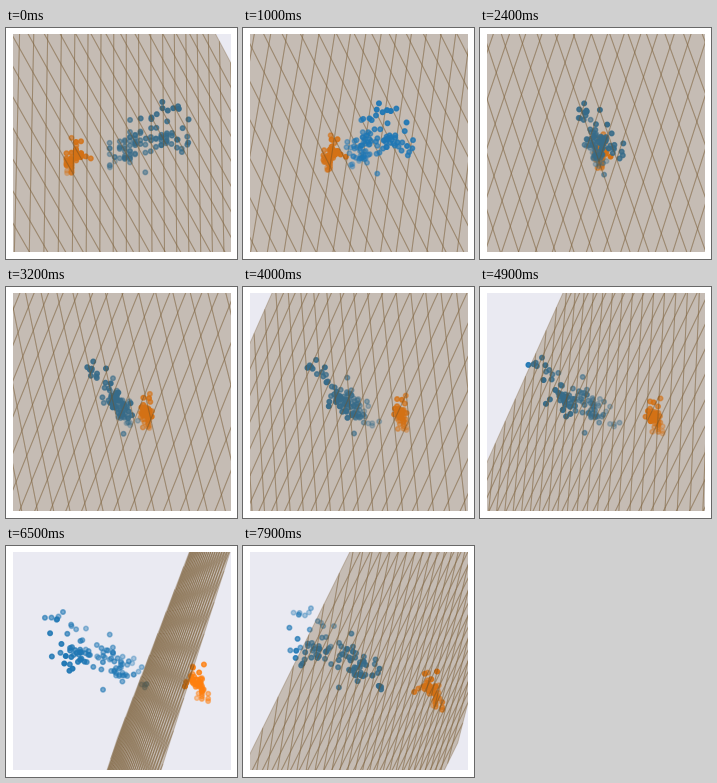
Recreate the animation shown at these times as a matplotlib script. Size 231x231 px, loop 8000 ms.

```python
import numpy as np
import matplotlib.pyplot as plt
from matplotlib.animation import FuncAnimation
from matplotlib.collections import PolyCollection
from matplotlib.colors import to_rgb

STAGE, DPI = 231, 72
PAD, SIDE = 7.2, 217.44
FRAMES, STEP = 80, 2          # degrees of azimuth per frame
ELEV = np.radians(10)
DIST = 10 * SIDE / 1.85       # camera distance in pixels

# Axes: petal length, petal width, sepal length (cm)
MID = np.array([3.95, 1.3, 6.1])
SPAN = np.array([5.9, 2.4, 3.6])
BOX = np.array([122.1, 122.1, 91.6])
MEAN = np.array([3.758, 1.199, 5.843])
STD = np.array([1.7594, 0.7597, 0.8253])

rng = np.random.default_rng(4)


def cloud(n, mean, std, corr, low, high):
    """Correlated measurements, rounded to a millimetre."""
    ab, ac, bc = corr
    r = np.array([[1, ab, ac], [ab, 1, bc], [ac, bc, 1]])
    pts = rng.multivariate_normal(mean, r * np.outer(std, std), n)
    return np.clip(pts, low, high).round(1)


def place(p):
    """Centimetres to box coordinates."""
    return (np.asarray(p) - MID) / SPAN * BOX


def project(p, azim):
    """Perspective view: screen positions and nearness to the camera."""
    x, y, z = np.moveaxis(p, -1, 0)
    c, s = np.cos(azim), np.sin(azim)
    front = x * c + y * s
    right = y * c - x * s
    up = z * np.cos(ELEV) - front * np.sin(ELEV)
    near = front * np.cos(ELEV) + z * np.sin(ELEV)
    scale = 1 / (1 - near / DIST)
    return np.stack([right * scale, up * scale], -1), near


setosa = np.vstack([
    [(1.2, .2, 5.8), (1.1, .1, 4.3), (1.6, .6, 5.0), (1.7, .5, 5.1),
     (1.9, .4, 5.1), (1.7, .3, 5.7), (1.5, .4, 5.7)],
    cloud(43, (1.45, .23, 4.98), (.15, .08, .3), (.33, .27, .28),
          (1.0, .1, 4.4), (1.9, .4, 5.5)),
])
others = np.vstack([
    [(6.9, 2.3, 7.7), (6.7, 2.2, 7.7), (6.7, 2.0, 7.7), (6.1, 2.3, 7.7),
     (6.4, 2.0, 7.9), (6.6, 2.1, 7.6), (6.3, 1.8, 7.3), (6.1, 2.5, 7.2),
     (6.0, 1.8, 7.2), (5.8, 1.6, 7.2), (6.1, 1.9, 7.4), (5.9, 2.1, 7.1),
     (4.5, 1.7, 4.9), (6.0, 2.5, 6.3), (5.1, 2.4, 5.8)],
    cloud(35, (5.35, 2.02, 6.37), (.33, .26, .32), (.32, .8, .28),
          (4.8, 1.4, 5.6), (6.1, 2.5, 6.9)),
    [(3.3, 1.0, 4.9), (3.3, 1.0, 5.0), (3.5, 1.0, 5.0), (3.0, 1.1, 5.1),
     (4.7, 1.4, 7.0), (4.1, 1.0, 5.8), (4.0, 1.0, 6.0), (3.5, 1.0, 5.7),
     (3.7, 1.0, 5.5), (3.9, 1.4, 5.2)],
    cloud(40, (4.42, 1.38, 6.0), (.33, .15, .42), (.7, .7, .5),
          (3.6, 1.1, 5.4), (5.1, 1.8, 6.9)),
])

# Separating plane over standardised axes
t = np.linspace(-5, 5, 30)
gx, gy = np.meshgrid(t, t)
gz = -3.78 * gx - 3.39 * gy - 4.75
plane = place(np.stack([gx, gy, gz], -1) * STD + MEAN)

fig = plt.figure(figsize=(STAGE / DPI, STAGE / DPI), dpi=DPI, facecolor="white")
ax = fig.add_axes([PAD / STAGE, PAD / STAGE, SIDE / STAGE, SIDE / STAGE],
                  facecolor="#EAEAF2")
ax.set(xticks=[], yticks=[])
ax.spines[:].set_visible(False)
lim = (-SIDE * 0.95 / 1.85, SIDE * 0.9 / 1.85)
ax.set_xlim(lim)
ax.set_ylim(lim)

brown = (0.445, 0.32, 0.148, 0.3)
sheet = PolyCollection([], facecolors=[brown], edgecolors=[brown], linewidths=1)
ax.add_collection(sheet, autolim=False)


def dots(pts, color):
    art = ax.scatter(np.zeros(len(pts)), np.zeros(len(pts)), s=20, linewidths=1.5)
    return art, place(pts), to_rgb(color)


groups = [dots(others, "#1f77b4"), dots(setosa, "#ff7f0e")]


def update(i):
    azim = np.radians(STEP * i)
    xy, near = project(plane, azim)
    quads = np.stack([xy[:-1, :-1], xy[:-1, 1:], xy[1:, 1:], xy[1:, :-1]], 2)
    sheet.set_verts(quads.reshape(-1, 4, 2))
    depth = [(near.max(), sheet)]

    for art, pts, rgb in groups:
        xy, near = project(pts, azim)
        order = np.argsort(near)
        near = near[order]
        fade = 0.3 + 0.7 * (near - near[0]) / (near[-1] - near[0])
        art.set_offsets(xy[order])
        art.set_color(np.column_stack([np.tile(rgb, (len(fade), 1)), fade]))
        depth.append((near[-1], art))

    # Whole layers stack by their nearest point
    for z, (_, art) in enumerate(sorted(depth, key=lambda d: d[0])):
        art.set_zorder(z + 1)
    return [art for _, art in depth]


anim = FuncAnimation(fig, update, frames=FRAMES, interval=100,
                     repeat=True, repeat_delay=0, blit=False)
plt.show()
```
